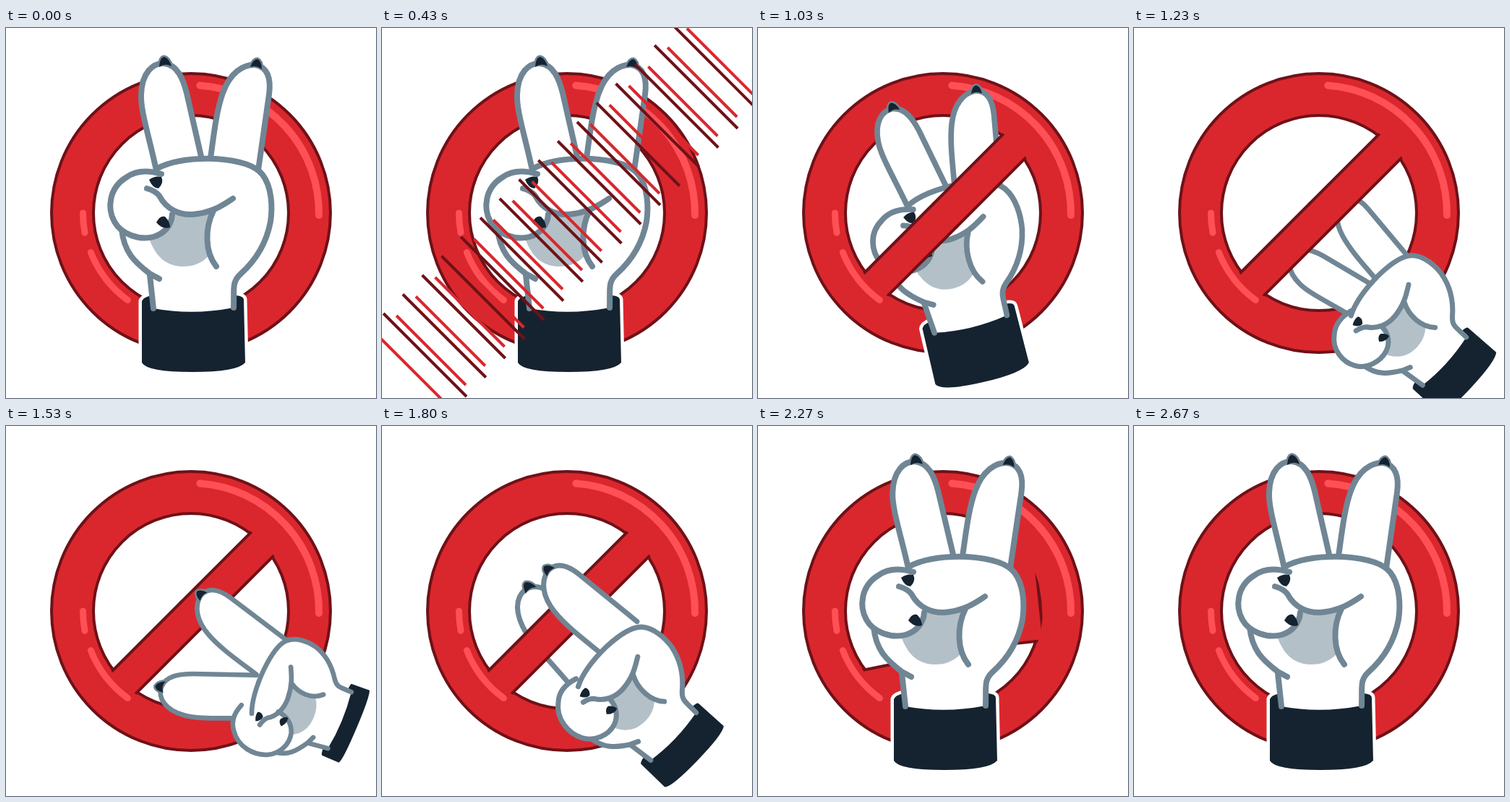
Write an HTML page with a canvas that moves like this. It is 512 by 512 pixels and loops after 3 s.

```html
<!DOCTYPE html>
<html lang="en">
<head>
<meta charset="utf-8">
<title>Cut the ban</title>
<style>
html, body { margin: 0; width: 100%; height: 100%; overflow: hidden; background: #fff; }
canvas { display: block; width: 512px; height: 512px; }
</style>
</head>
<body>
<canvas id="stage" width="512" height="512"></canvas>
<script>
const ctx = document.getElementById('stage').getContext('2d');
const LOOP = 3000, RAD = Math.PI / 180;
const RED = '#da272d', MAROON = '#6f1118', SHINE = '#ff5056';
const NAVY = '#152330', GREY = '#708695', SHADE = '#b4c0c7', WHITE = '#fff';

const shapes = {
  left: 'M208 197 C198 150 186 115 187 92 C188 62 203 48 219 49 C237 51 245 70 250 90 L271 182',
  leftNail: 'M212 54 Q213 40 219 40 Q226 42 229 53 Q220 48 212 54Z',
  right: 'M283 180 C288 145 291 115 300 90 C310 62 328 50 345 51 C362 54 367 70 364 92 L349 197',
  rightNail: 'M338 54 Q342 43 348 43 Q354 46 354 57 Q346 51 338 54Z',
  sleeve: 'M188 378 Q190 372 203 370 L318 370 Q329 371 329 376 L331 463 Q320 476 258 476 Q195 476 188 463Z',
  palm: 'M208 195 C230 183 260 180 290 181 C320 183 345 190 355 203 C368 220 369 248 366 268 C360 300 345 322 325 340 C312 352 316 360 315 387 Q258 398 204 388 L199 345 C185 333 163 312 160 278Z',
  top: 'M208 195 C230 183 260 180 290 181 C320 183 345 190 355 203 C368 220 369 248 366 268 C360 300 345 322 325 340 C312 352 316 360 315 387',
  wrist: 'M160 278 C163 310 178 324 199 340 L212 347 M199 342 L204 388',
  shade: 'M198 291 C208 320 225 330 246 330 C266 330 279 319 283 311 C276 290 280 268 287 253 L230 255 L226 275Z',
  fist: 'M215 202 C195 196 178 198 166 207 C142 222 140 250 150 268 C160 286 185 294 204 289 C218 285 229 274 230 258',
  thumb: 'M195 222 Q206 225 212 232 C222 251 240 259 258 258 C285 256 300 245 314 236',
  crease: 'M287 253 C275 277 275 310 291 330',
  nails: 'M198 210 Q206 204 215 206 Q219 214 211 222 Q203 222 198 210Z M208 269 Q213 259 220 261 Q227 268 227 276 Q216 279 208 269Z'
};
for (const name in shapes) shapes[name] = new Path2D(shapes[name]);

// time, palm x, y, turn, scale x, scale y, squash, left turn, left size, right turn, right size
const handKeys = [
  [0, 260, 290, 0, 1, 1, 0, 0, 1, 0, 1],
  [870, 260, 290, 0, 1, 1, 0, 0, 1, 0, 1],
  [1030, 274, 321, -13, .93, .93, 0, -13, .93, -13, .93],
  [1250, 385, 415, -50, .8, .7, .4, -50, .8, -50, .8],
  [1400, 412, 395, -67, .76, .62, 1, -78, .9, -58, .9],
  [1530, 408, 384, -67, .76, .6, 1, -76, .93, -61, .93],
  [1800, 352, 379, -46, .82, .74, .55, -28, 1, -59, .97],
  [1970, 262, 290, -.5, 1, 1, 0, 12.4, 1, -14, 1],
  [2080, 260, 290, 0, 1, 1, 0, 12.4, 1, -14, 1],
  [2320, 260, 290, 0, 1, 1, 0, -2, 1, 2, 1],
  [2430, 260, 290, 0, 1, 1, 0, 0, 1, 0, 1],
  [LOOP, 260, 290, 0, 1, 1, 0, 0, 1, 0, 1]
];
// time, lower half turn, upper half turn
const cutKeys = [
  [0, 0, 0], [1900, 0, 0], [1970, -4, -4], [2300, 36, -52], [2430, 42, -45], [LOOP, 42, -45]
];

const clamp = v => Math.min(1, Math.max(0, v));
const ease = (t, from, to) => { const p = clamp((t - from) / (to - from)); return p * p * (3 - 2 * p); };

// Cubic interpolation that rests at every turning point
function pose(keys, t) {
  let i = 0;
  while (i < keys.length - 2 && t >= keys[i + 1][0]) i++;
  const slope = (a, c) => keys[a] && keys[a + 1] ? (keys[a + 1][c] - keys[a][c]) / (keys[a + 1][0] - keys[a][0]) : 0;
  const tangent = (k, c) => {
    const a = slope(k - 1, c), b = slope(k, c);
    return a * b > 0 ? 2 * a * b / (a + b) : 0;
  };
  const span = keys[i + 1][0] - keys[i][0], p = (t - keys[i][0]) / span, q = 1 - p;
  return keys[i].slice(1).map((v, n) => {
    const c = n + 1;
    return v * q * q * (1 + 2 * p) + keys[i + 1][c] * p * p * (3 - 2 * p)
      + span * p * q * (q * tangent(i, c) - p * tangent(i + 1, c));
  });
}

function paint(shape, matrix, fill, stroke, width) {
  const path = new Path2D();
  path.addPath(shape, matrix);
  if (fill) { ctx.fillStyle = fill; ctx.fill(path); }
  if (stroke) { ctx.strokeStyle = stroke; ctx.lineWidth = width; ctx.stroke(path); }
}

function arc(radius, from, to, color, width) {
  ctx.beginPath();
  ctx.arc(256, 256, radius, from * RAD, to * RAD);
  ctx.strokeStyle = color;
  ctx.lineWidth = width;
  ctx.stroke();
}

function drawRing() {
  arc(164, 0, 360, RED, 58);
  arc(193, 0, 360, MAROON, 4);
  arc(135, 0, 360, MAROON, 4);
  arc(177, -86, 1, SHINE, 10);
  arc(149.5, 169.5, 180, SHINE, 9);
  arc(149, 126, 158.5, SHINE, 9);
}

function makeHand(t) {
  const [x, y, turn, sx, sy, squash, leftTurn, leftSize, rightTurn, rightSize] = pose(handKeys, t);
  const m = new DOMMatrix().translate(x, y).rotate(turn).scale(sx, sy).translate(-260, -290);
  const weight = 8 * Math.sqrt((sx + sy) / 2);
  const stretchY = (cy, s) => m.translate(0, cy).scale(1, s).translate(0, -cy);
  const line = name => paint(shapes[name], m, null, GREY, weight);

  function finger(name, baseX, angle, size) {
    const base = m.transformPoint(new DOMPoint(baseX, 190));
    const f = new DOMMatrix().translate(base.x, base.y).rotate(angle).scale(size).translate(-baseX, -190);
    paint(shapes[name + 'Nail'], f, null, GREY, 5);
    paint(shapes[name], f, WHITE, GREY, weight);
    paint(shapes[name + 'Nail'], f, NAVY);
  }

  return {
    left() { finger('left', 240, leftTurn, leftSize); },
    rest() {
      finger('right', 316, rightTurn, rightSize);
      const cuff = stretchY(385, 1 - squash / 2);
      paint(shapes.sleeve, cuff, null, WHITE, .01 + 9 * clamp(1 - 2 * squash));
      paint(shapes.sleeve, cuff, NAVY);
      paint(shapes.palm, m, WHITE);
      paint(shapes.shade, m, SHADE);
      line('wrist');
      paint(shapes.fist, stretchY(275, 1 + squash / 2), WHITE, GREY, weight);
      ['top', 'thumb', 'crease'].forEach(line);
      paint(shapes.nails, m, NAVY);
    }
  };
}

// One half of the bar, hinged where it meets the ring
function drawHalf(side, angle, length, halfWidth, cut) {
  ctx.save();
  ctx.beginPath();
  ctx.arc(256, 256, 138, 0, 7);
  ctx.clip();
  ctx.translate(259, 259);
  ctx.rotate(-45 * RAD + (side < 0 ? Math.PI : 0));
  ctx.translate(140, 0);
  ctx.rotate(angle * RAD);
  const tip = -length - (cut ? 0 : .7);
  ctx.fillStyle = RED;
  ctx.fillRect(tip, -halfWidth, length + 30, halfWidth * 2);
  ctx.beginPath();
  ctx.moveTo(30, -halfWidth);
  ctx.lineTo(tip, -halfWidth);
  ctx[cut ? 'lineTo' : 'moveTo'](tip, halfWidth);
  ctx.lineTo(30, halfWidth);
  ctx.strokeStyle = MAROON;
  ctx.lineWidth = 4;
  ctx.stroke();
  ctx.restore();
}

function drawBar(t) {
  const halfWidth = 22.6 * ease(t, 450, 700);
  const length = 140 * (1 - ease(t, 2440, 2670));
  if (halfWidth < .5 || length < .5) return;
  const [lower, upper] = pose(cutKeys, t), cut = t > 1900;
  drawHalf(-1, lower, length, halfWidth, cut);
  drawHalf(1, upper, length, halfWidth, cut);
}

// Hatching that sweeps up the diagonal, then closes onto the bar
function drawSlash(t) {
  if (t <= 330 || t >= 830) return;
  const size = 1 - ease(t, 430, 830);
  const reach = 17 * clamp((t - 330) / 90) - 1;
  function hatch(x1, y1, x2, y2, color) {
    const dx = (x2 - x1) / 2 * size, dy = (y2 - y1) / 2 * size;
    const cx = (x1 + x2) / 2, cy = (y1 + y2) / 2;
    ctx.beginPath();
    ctx.moveTo(cx - dx, cy - dy);
    ctx.lineTo(cx + dx, cy + dy);
    ctx.strokeStyle = color;
    ctx.lineWidth = 4 * size;
    ctx.stroke();
  }
  ctx.lineCap = 'butt';
  for (let k = -1; k < reach; k++) {
    const x = 2 + k * 26.8, y = 395 - k * 26.5;
    if (k >= 0) hatch(x, y, x + 115, y + 115, MAROON);
    hatch(x + 18, y + 3, x + 114, y + 99, RED);
  }
}

function draw(t) {
  ctx.fillStyle = WHITE;
  ctx.fillRect(0, 0, 512, 512);
  ctx.lineCap = ctx.lineJoin = 'round';
  const hand = makeHand(t), bar = () => drawBar(t);
  drawRing();
  const layers = t < 1250 ? [hand.left, hand.rest, bar]
    : t < 1880 ? [hand.left, bar, hand.rest]
    : [bar, hand.left, hand.rest];
  layers.forEach(layer => layer());
  drawSlash(t);
}

const start = performance.now();
function tick() {
  draw((performance.now() - start) % LOOP);
  requestAnimationFrame(tick);
}
tick();
</script>
</body>
</html>
```
